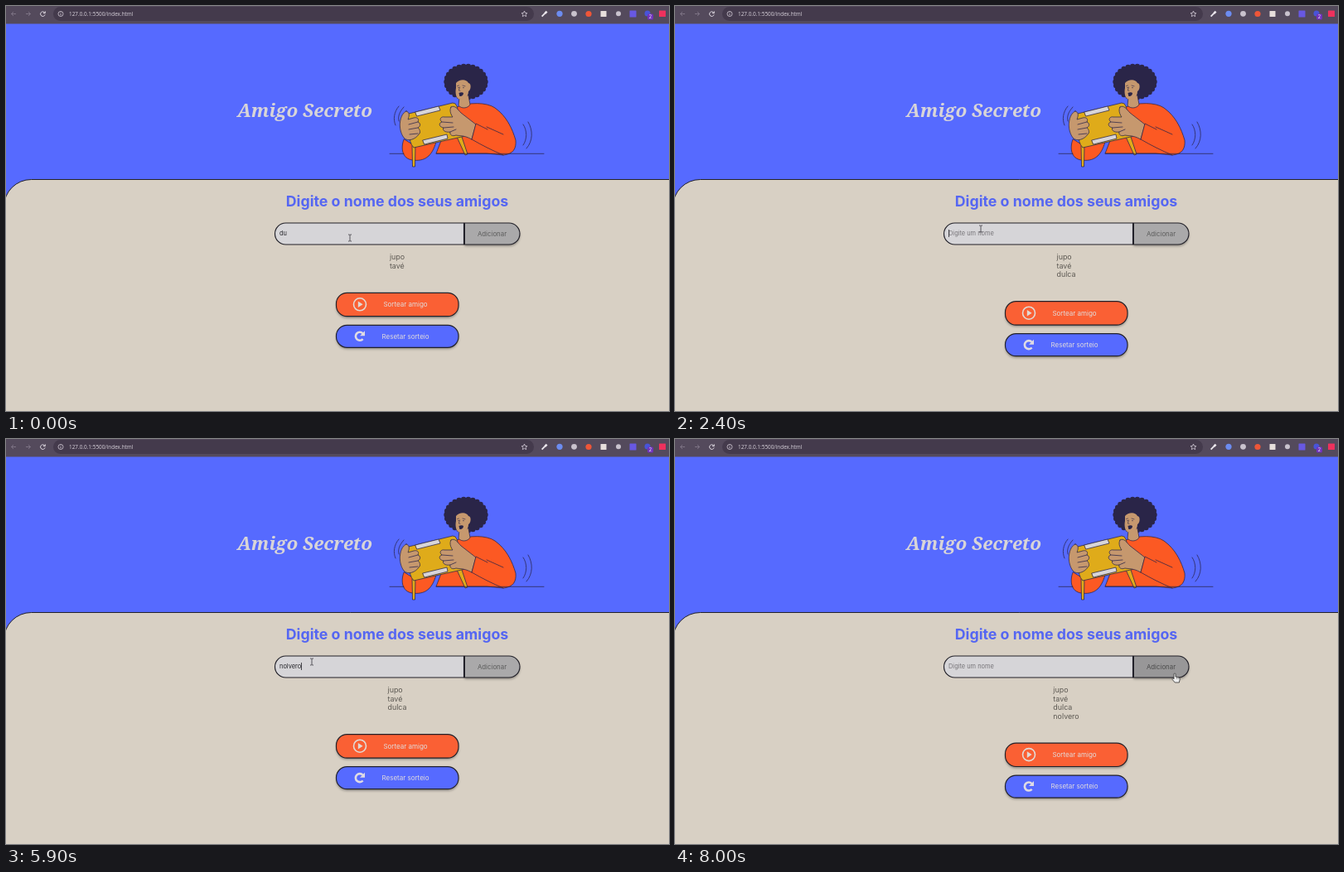
These frames come from a looping animation (800 px wide and 489 px high, 8100 ms). An HTML page with a canvas:

```html
<!DOCTYPE html>
<html lang="pt">
<head>
<meta charset="utf-8">
<title>Amigo Secreto</title>
<style>
html, body { margin: 0; width: 100%; height: 100%; overflow: hidden; background: #d8d0c4; }
canvas { display: block; width: 800px; height: 489px; }
</style>
</head>
<body>
<canvas id="stage"></canvas>
<script>
const W = 800, H = 489, LOOP = 8100;
const canvas = document.getElementById('stage');
const c = canvas.getContext('2d');
const dpr = window.devicePixelRatio || 1;
canvas.width = W * dpr;
canvas.height = H * dpr;

const BLUE = '#566aff', SAND = '#d8d0c4', PALE = '#d8d5d8', INK = '#222129';
const NAVY = '#2a2548', SKIN = '#c6986e', ORANGE = '#fc5923', GOLD = '#dfab1a';
const SANS = 'Inter, sans-serif';
const BORDER = 1.15;
const FRIENDS = ['jupo', 'tavé', 'dulca', 'nolvero'];

// time, field text, focused, friends listed
const FIELD = [
  [-500, 'du', true, 2], [200, 'dul', true, 2], [400, 'dulc', true, 2], [700, 'dulca', true, 2],
  [1700, '', false, 3], [2300, '', true, 3],
  [3600, 'n', true, 3], [3800, 'no', true, 3], [4000, 'nol', true, 3], [4100, 'nolv', true, 3],
  [5000, 'nolv', true, 3], [5200, 'nolve', true, 3], [5400, 'nolver', true, 3], [5500, 'nolvero', true, 3],
  [6800, '', false, 4]
];

// time, x, y
const POINTER = [
  [0, 415, 280], [1000, 415, 280], [1400, 602, 277], [1500, 604, 278], [1900, 604, 278],
  [2300, 369, 269], [5900, 369, 269], [6400, 605, 282], [7300, 605, 282], [7400, 602, 283], [LOOP, 602, 283]
];

function text(s, x, y, size, color, align = 'left', weight = 400, family = SANS) {
  c.font = `${weight} ${size}px ${family}`;
  c.fillStyle = color;
  c.textAlign = align;
  c.fillText(s, x, y);
}

function paint(path, fill, stroke, width = 1) {
  if (typeof path === 'string') path = new Path2D(path);
  if (fill) { c.fillStyle = fill; c.fill(path); }
  if (stroke) { c.strokeStyle = stroke; c.lineWidth = width; c.stroke(path); }
}

function box(x, y, w, h, radius) {
  const p = new Path2D();
  p.roundRect(x, y, w, h, radius);
  return p;
}

function disc(x, y, rx, ry = rx) {
  const p = new Path2D();
  p.ellipse(x, y, rx, ry, 0, 0, Math.PI * 2);
  return p;
}

function shadowed(draw) {
  c.save();
  c.shadowColor = 'rgba(0,0,0,.35)';
  c.shadowBlur = 3 * dpr;
  c.shadowOffsetY = 2 * dpr;
  draw();
  c.restore();
}

function toolbar() {
  c.fillStyle = '#544a5c';
  c.fillRect(0, 0, W, 21.5);
  paint(box(57, 1, 580, 17, 8.5), '#443a4c');
  paint('M12 9.5H6.5M9 7L6.5 9.5L9 12M24 9.5H29.5M27 7L29.5 9.5L27 12', null, '#82788a', 0.9);
  paint('M46.8 8.2A2.8 2.8 0 1 0 47.1 10.4M47.3 6.4V8.6H45', null, '#dcd6df', 1);
  paint(disc(66, 9.5, 3), null, '#d3ccd7', 0.8);
  paint('M66 9V11.2M66 7.5V8.2', null, '#d3ccd7', 0.8);
  text('127.0.0.1:5500/index.html', 76, 11.8, 6.4, '#d9d3dc', 'left', 400, '"Open Sans", sans-serif');
  paint('M625.5 6L626.5 8.4L629 8.6L627.1 10.2L627.7 12.7L625.5 11.4L623.3 12.7L623.9 10.2L622 8.6L624.5 8.4Z', null, '#d3ccd7', 0.8);
  paint('M646.6 12.6L651 8.2', null, '#ece8ee', 1.8);
  paint('M650.4 8.8L652.6 6.6', null, '#ece8ee', 2.6);
  paint(disc(668, 9.3, 3.6), '#6c8cf0');
  paint(disc(685.5, 9.3, 3.4), '#c9c2cd');
  paint(disc(703, 9.5, 3.6), '#ee5638');
  paint(box(717.5, 6, 7, 7, 0.5), '#e6dedb');
  paint(disc(739, 9.3, 3), '#c9c2cd');
  paint(box(752.5, 5.5, 8, 8, 0.5), '#6858e2');
  paint(disc(774, 9, 3.5), '#4854d8');
  paint(box(774, 9.5, 7, 7, 1.5), '#7132bd');
  text('2', 777.5, 15.2, 5.5, '#fff', 'center');
  paint(box(788, 5.5, 8, 7.5, 0.5), '#ee315d');
}

function person() {
  c.save();
  c.lineJoin = c.lineCap = 'round';
  const line = (d, w = 0.75) => paint(d, null, NAVY, w);
  const shape = (d, fill) => paint(d, fill, NAVY, 0.75);

  for (let i = 0; i < 26; i++) {
    const a = i * Math.PI / 13;
    paint(disc(555 + 23.5 * Math.cos(a), 91.5 + 18.8 * Math.sin(a), 3.2), NAVY);
  }
  paint(disc(555, 91.5, 24.5, 19.8), NAVY);

  shape('M544 122C558 116 580 116 590 123C604 133 611 148 615 162C616 172 612 179 600 180L580 178H519L526 160L545 150Z', ORANGE);
  shape('M547 110L546 120C550 125 558 123 560 119L558 108Z', SKIN);
  paint('M543 93C546 89 555 87 558 93C562 93 561 102 558 103C558 110 553 113 547 112.5C542.5 111 542 104 543 99Z', SKIN);
  line('M544.5 96.5L546.5 96M551 96L554 96.8M547.5 98L546.3 102L548 102.3', 0.6);
  paint(disc(546, 98.6, 0.7), NAVY);
  paint(disc(552, 98.6, 0.7), NAVY);
  paint('M546.5 105C548 104 551 104 552 105C552 108 549 109.5 547.3 108.7Z', NAVY);

  shape('M480 161C476 172 478 184 490 186C505 188 514 182 519 164L494 169Z', ORANGE);
  shape('M490 169L490.5 194H493.5L494 168Z', GOLD);
  shape('M544 158L554 180L557 179L549 155Z', GOLD);
  shape('M482 131L539 117Q543 117 544 121L554 157L492 171Q489 168 488 164Z', GOLD);
  shape('M494 128L522 121L524 126L496 133Z', PALE);
  shape('M503 162L532 155L533 160L505 167Z', PALE);

  shape('M483 127C475 130 472 148 480 159C485 165 495 160 498 155C501 153 499 148 497 147C501 145 500 141 497 140C499 136 496 134 492 135L485 137C487 132 487 128 483 127Z', SKIN);
  line('M497 140L486 143M497 147L486 149M497 154L487 155');
  shape('M537 122C542 119 545 125 549 129L567 143L562 161C553 156 548 157 543 156C538 158 535 155 536 152C530 153 526 150 528 147C522 146 522 141 526 140C522 137 525 133 529 134L539 134C536 130 535 125 537 122Z', SKIN);
  line('M526 140L539 141M528 147L540 146M536 152L543 149');
  paint('M567 142C578 150 590 151 600 155C611 161 613 174 601 179C586 175 574 168 562 161Z', ORANGE);
  line('M562 161L567 142L581 149M580 146L600 155M562 161C574 168 588 175 600 180');

  line('M463 178.3H480M519 178.3H649');
  line('M474 121C468 128 467 137 470 144M480 122C474 129 473 133 474 139');
  line('M624 143C629 150 629 161 624 168M630 140C636 150 636 163 628 172');
  c.restore();
}

function backdrop() {
  c.fillStyle = BLUE;
  c.fillRect(0, 21, W, H);
  toolbar();
  text('Amigo Secreto', 360.5, 133.7, 22.4, PALE, 'center', 'italic 700', '"Noto Serif", serif');
  person();
  paint(box(-2.5, 209.5, W + 40, 320, 33), SAND, INK, 1);
  text('Digite o nome dos seus amigos', 472, 242, 17.8, '#5566f2', 'center', 700);
}

function field(t, [since, value, focused], hover) {
  const button = box(553.4, 262, 66.6, 26, [0, 13, 13, 0]);
  shadowed(() => paint(button, hover ? '#989798' : '#aaa9aa'));
  paint(button, null, INK, BORDER);
  text('Adicionar', 586.5, 277.7, 7.85, hover ? '#4b4b4b' : '#5c5c5c', 'center');
  paint(box(324.5, 262, 228, 26, [13, 0, 0, 13]), '#d6d5d8', INK, BORDER);
  text(value || 'Digite um nome', 330, 277.2, 7.41, value ? '#26262b' : '#777579');
  if (focused && Math.floor((t - since) / 500) % 2 === 0) {
    const x = 330 + (value ? c.measureText(value).width : 0);
    c.fillStyle = INK;
    c.fillRect(x, 270, 0.8, 9);
  }
}

function action(y, h, fill, label) {
  const p = box(398.5, y, 147.5, h, 13);
  shadowed(() => paint(p, fill));
  paint(p, null, INK, BORDER);
  text(label, 482, y + h / 2 + 2.8, 8, '#e2dcdc', 'center');
}

function list(count) {
  const names = FRIENDS.slice(0, count);
  c.font = `400 8.9px ${SANS}`;
  const left = 472 - Math.max(...names.map(n => c.measureText(n).width)) / 2;
  names.forEach((n, i) => text(n, left, 306.3 + i * 10.4, 8.9, '#5d5953'));

  c.save();
  c.translate(0, (count - 2) * 10.4);
  action(346.3, 28.4, '#fa6034', 'Sortear amigo');
  paint(disc(427, 360.3, 7.5), null, '#e2dad5', 1.6);
  paint('M424.8 356.5V364.1L430.6 360.3Z', '#e2dad5');
  action(385.3, 27, BLUE, 'Resetar sorteio');
  paint('M430.5 395.3A5 5 0 1 0 430.6 402.1', null, '#dfdbe4', 2.6);
  paint('M433 392.3V398.3H427Z', '#dfdbe4');
  c.restore();
}

function pointer(x, y, hand) {
  c.save();
  c.translate(x, y);
  c.lineJoin = 'round';
  if (hand) {
    paint('M0 1C0 -.6 2 -.6 2 1V4L6 5Q7.4 5.4 7.2 7L6.4 11H1.2L-2 7.2C-2.4 6 -1 5.6 0 6.8Z', '#eee', '#333', 0.8);
    paint('M3.5 5V7M5.2 5.4V7', null, '#555', 0.5);
  } else {
    paint('M-2 -4H-.5L0 -3.5L.5 -4H2M0 -3.5V3.5M-2 4H-.5L0 3.5L.5 4H2', null, '#36343a', 0.8);
  }
  c.restore();
}

function pointerAt(t) {
  const i = POINTER.findIndex(p => p[0] > t);
  const [t0, x0, y0] = POINTER[i - 1], [t1, x1, y1] = POINTER[i];
  const u = (t - t0) / (t1 - t0);
  const k = u * u * (3 - 2 * u);
  return [x0 + (x1 - x0) * k, y0 + (y1 - y0) * k];
}

function frame(now) {
  const t = Math.floor((now % LOOP) / 100) * 100;
  const state = FIELD.filter(s => s[0] <= t).pop();
  const [x, y] = pointerAt(t);
  const hover = x > 553;
  c.setTransform(dpr, 0, 0, dpr, 0, 0);
  backdrop();
  field(t, state, hover);
  list(state[3]);
  pointer(x, y, hover);
}

const start = performance.now();
function tick() {
  frame(performance.now() - start);
  requestAnimationFrame(tick);
}
tick();
</script>
</body>
</html>
```
